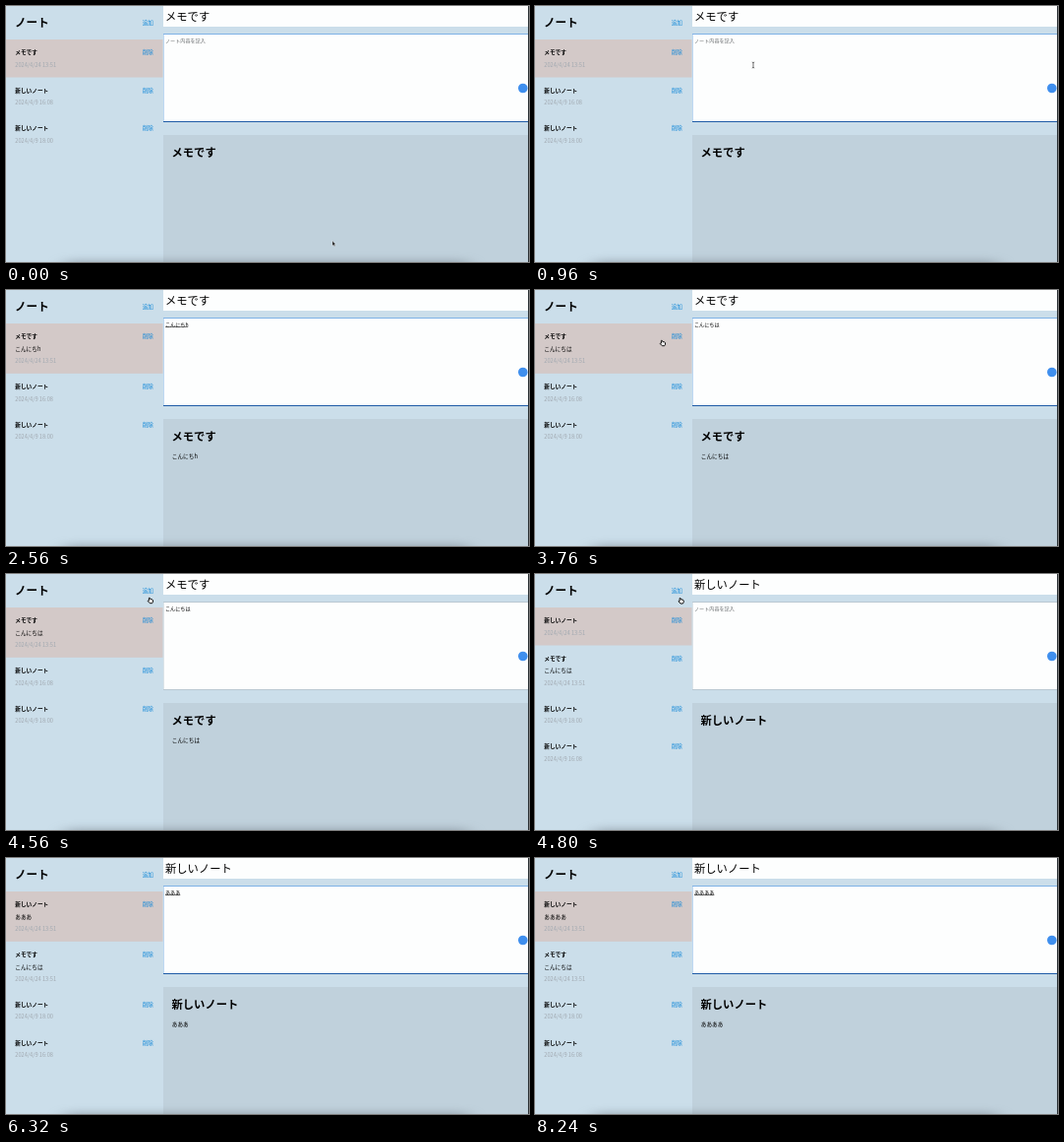
Write an HTML page that moves like this. It is 532x260 px and loops after 8320 ms.

```html
<!DOCTYPE html>
<html>
<head>
<meta charset="utf-8">
<title>Notes</title>
<style>
html, body { margin: 0; width: 100%; height: 100%; overflow: hidden; background: #cbdeea; }
svg { display: block; width: 532px; height: 260px; }
text { font-family: "Noto Sans CJK JP", "Noto Sans CJK", sans-serif; white-space: pre; }
</style>
</head>
<body>
<svg id="stage" viewBox="0 0 532 260">
  <defs><filter id="soft" x="-10%" y="-200%" width="120%" height="500%"><feGaussianBlur stdDeviation="9 4"/></filter></defs>
  <g id="view"></g>
</svg>
<script>
const LOOP = 8320, STEP = 80;
const SMALL = 5.67, LARGE = 11.3;
const INK = '#000', LINK = '#1288d8', FAINT = '#a0a8b0';
const ADD_TIME = 4720;
const view = document.getElementById('view');

// [time, text] pairs; the last one already reached is on screen
const firstTyping = [[0, ''], [1200, 'k'], [1680, 'こ'], [1920, 'こn'], [2080, 'こん'],
  [2240, 'こんに'], [2400, 'こんにち'], [2560, 'こんにちh'], [2720, 'こんにちは']];
const secondTyping = [[0, ''], [5920, 'あ'], [6080, 'ああ'], [6320, 'あああ'], [6720, 'ああああ']];

// [time, x, y]
const pointerPath = [[0, 332, 241], [80, 332, 241], [800, 222, 60], [3600, 222, 60],
  [3760, 130, 54], [4160, 142, 34], [4480, 147, 27], [4720, 147, 27], [5280, 178, 33], [8320, 178, 33]];

const typed = (steps, t) => steps.filter(s => s[0] <= t).pop()[1];

const rect = (x, y, w, h, fill, extra = '') =>
  `<rect x="${x}" y="${y}" width="${w}" height="${h}" fill="${fill}" ${extra}/>`;

// y is the vertical middle of the glyphs
const label = (x, y, text, size = SMALL, fill = INK, weight = 400) =>
  `<text x="${x}" y="${y + size * 0.38}" font-size="${size}" fill="${fill}" font-weight="${weight}">${text}</text>`;

function pointerAt(t) {
  const i = pointerPath.findIndex(p => p[0] > t);
  const [t0, x0, y0] = pointerPath[i - 1], [t1, x1, y1] = pointerPath[i];
  const k = (t - t0) / (t1 - t0), ease = k * k * (3 - 2 * k);
  return [x0 + (x1 - x0) * ease, y0 + (y1 - y0) * ease];
}

function pointer(t) {
  if ((t >= 1200 && t < 3680) || t >= 5520) return '';
  const [x, y] = pointerAt(t);
  let shape;
  if (x < 159) {
    shape = '<path d="M-1.6 -2.7 q.8 -.7 1.2 .4 l.3 .9 q1.8 -.2 2.5 .8 l.2 1.8 -.9 1.5 h-2.4 l-2 -2.1 q0 -.9 1.1 -.5z" fill="#eee" stroke="#111" stroke-width="1"/>';
  } else if (y > 28 && y < 118) {
    shape = '<path d="M-1.2 -3 L0 -2.4 1.2 -3 M0 -2.4 V2.4 M-1.2 3 L0 2.4 1.2 3" fill="none" stroke="#333" stroke-width=".7"/>';
  } else {
    shape = '<path d="M0 -2.5 V2.6 L1.2 1.5 2 3.2 2.8 2.8 2.1 1.2 H3.4z" fill="#111" stroke="#fff" stroke-width=".4"/>';
  }
  return `<g transform="translate(${x} ${y})">${shape}</g>`;
}

function sidebar(notes) {
  let out = label(9, 17, 'ノート', 11.6, INK, 700) + label(138.7, 17, '追加', SMALL, LINK);
  let top = 34;
  notes.forEach((note, i) => {
    const height = note.body ? 50.8 : 38.5;
    if (i === 0) out += rect(0, top, 159.5, height, '#d3c9c8');
    out += label(9.3, top + 13.3, note.title, SMALL, INK, 700);
    out += label(138.7, top + 13.3, '削除', SMALL, LINK);
    if (note.body) out += label(9.3, top + 25.8, note.body, SMALL, INK, 500);
    out += label(9.3, top + height - 12.8, note.date, SMALL, FAINT);
    top += height;
  });
  return out;
}

function editor(note, focused, composing) {
  const [light, dark] = focused ? ['#7fb2e6', '#1f5ca6'] : ['#b9c8d2', '#b9c8d2'];
  let out = rect(160, 0, 372, 21, '#fdfefe') + label(162, 10.3, note.title, LARGE);
  out += rect(160, 28, 372, 90, light) + rect(160, 117, 372, 1, dark);
  out += rect(160.5, 29, 371.5, 88, '#fdfefe');
  out += note.body ? label(162, 35, note.body, 5.1, INK, 500)
                   : label(162, 35, 'ノート内容を記入', 5.1, '#666a6c');
  if (composing) {
    const width = [...note.body].reduce((w, c) => w + (c < '~' ? 2.8 : 5.1), 0);
    out += rect(162, 37.2, width, 0.6, '#222');
  }
  out += rect(160, 131, 372, 129, '#c0d1dc');
  out += label(168.5, 148.3, note.title, LARGE, INK, 700);
  return out + label(168.8, 168.5, note.body, SMALL, INK, 500);
}

function render(t) {
  const added = t >= ADD_TIME;
  const today = '2024/4/24 13:51';
  const notes = [
    { title: 'メモです', body: typed(firstTyping, t), date: today },
    { title: '新しいノート', body: '', date: added ? '2024/4/9 18:00' : '2024/4/9 16:08' },
    { title: '新しいノート', body: '', date: added ? '2024/4/9 16:08' : '2024/4/9 18:00' }
  ];
  if (added) notes.unshift({ title: '新しいノート', body: typed(secondTyping, t), date: today });

  const focused = t < 4560 || t >= 5280;
  const composing = (t >= 1200 && t < 3520) || t >= 5920;
  view.innerHTML = rect(0, 0, 532, 260, '#cbdeea')
    + sidebar(notes)
    + editor(notes[0], focused, composing)
    + rect(60, 259, 410, 10, '#6f7c85', 'filter="url(#soft)" opacity=".55"')
    + '<circle cx="525.8" cy="83.5" r="4.8" fill="#3f8fee"/>'
    + rect(531, 0, 1, 260, '#2c3236')
    + pointer(t);
}

let shown = -1;
function tick() {
  const t = Math.floor(performance.now() % LOOP / STEP) * STEP;
  if (t !== shown) render(shown = t);
  requestAnimationFrame(tick);
}
tick();
</script>
</body>
</html>
```
